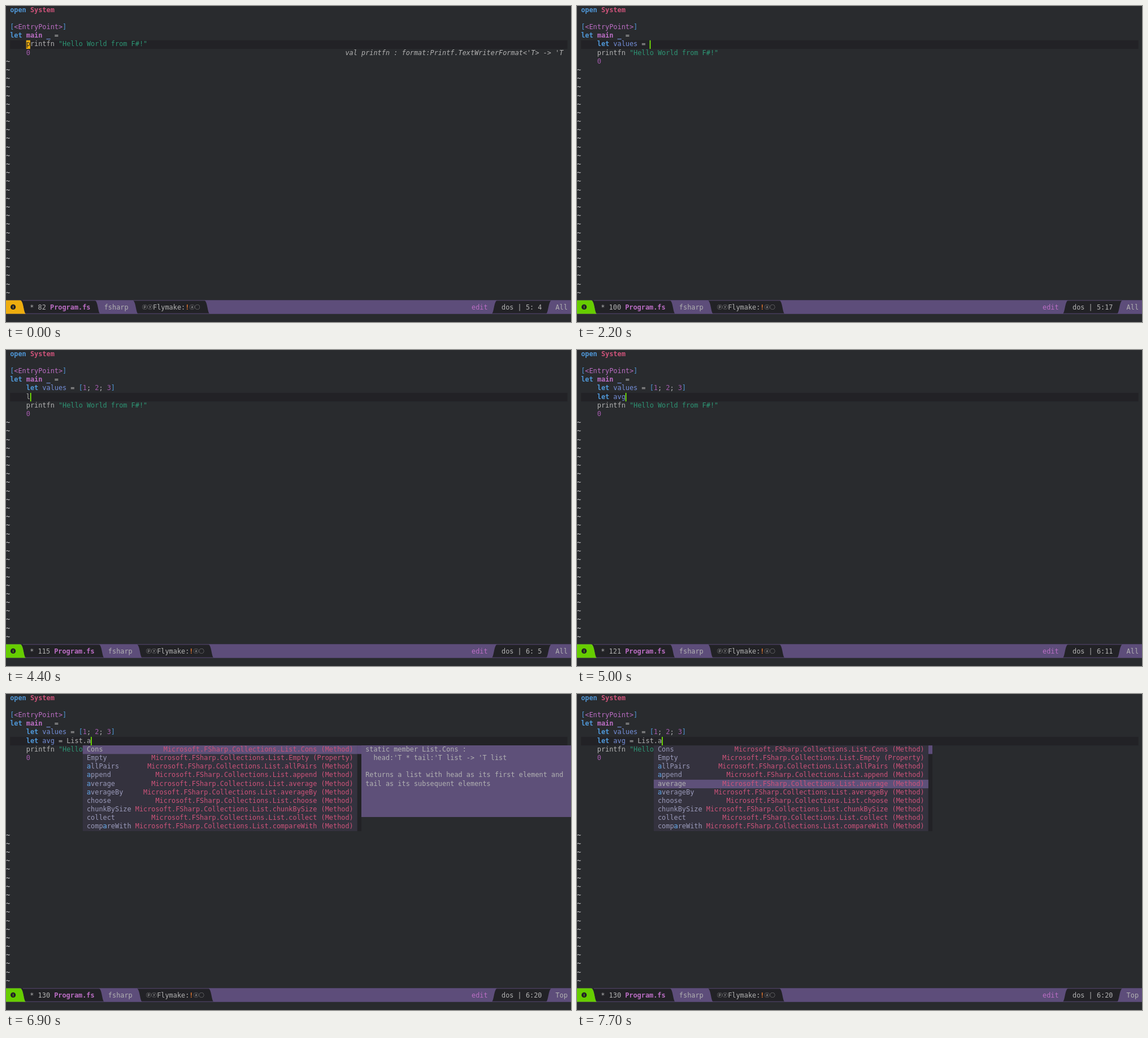
These frames come from a looping animation (1000x560 px, 8 s). An HTML page with a canvas:

```html
<!DOCTYPE html>
<html lang="en">
<head>
<meta charset="utf-8">
<title>F# completion</title>
<style>
html, body { margin: 0; width: 1000px; height: 560px; overflow: hidden; background: #292b2e; }
canvas { display: block; }
</style>
</head>
<body>
<canvas id="stage" width="1000" height="560"></canvas>
<script>
const ctx = document.getElementById('stage').getContext('2d', { alpha: false });
const CW = 7.148, LH = 15.19, LOOP = 8000;
const BG = '#292b2e', DARK = '#222226', PURPLE = '#5d4d7a', FG = '#b2b2b2', BLUE = '#4f97d7',
  PINK = '#ce537a', FUNC = '#bc6ec5', NUM = '#a45bad', VAR = '#7590db', STR = '#2d9574',
  ORANGE = '#eead0e', GREEN = '#66cd00', MENU = '#34323e', ITEM = '#9a9aba';

const FIRST = 'let values = [1; 2; 3]', SECOND = 'let avg = List.a';
// [time, characters typed so far]
const FIRST_KEYS = [[600, 0], [700, 1], [800, 2], [900, 3], [1000, 4], [1100, 5], [1300, 6], [1400, 7],
  [1500, 8], [1700, 9], [1800, 10], [1900, 11], [2000, 12], [2200, 13], [2300, 14], [2700, 16],
  [2800, 18], [2900, 20], [3000, 22]];
const SECOND_KEYS = [[3300, 0], [4400, 1], [4500, 2], [4600, 4], [4800, 5], [5000, 7], [5100, 8],
  [5300, 9], [5600, 10], [5800, 12], [5900, 13], [6000, 15], [6200, 16]];
const SELECTION = [[6300, 0], [7200, 1], [7400, 2], [7500, 3], [7700, 4]];
const ITEMS = ['Cons', 'Empty', 'allPairs', 'append', 'average', 'averageBy', 'choose',
  'chunkBySize', 'collect', 'compareWith'];

const at = (steps, t) => steps.reduce((v, [time, n]) => t >= time ? n : v, -1);

function rect(x, y, w, h, color) {
  ctx.fillStyle = color;
  ctx.fillRect(x, y, w, h);
}

// Characters sit on the fixed grid one by one.
function text(x, base, str, color, style = '') {
  ctx.font = `${style} 11.87px "DejaVu Sans Mono", monospace`;
  ctx.fillStyle = color;
  [...str].forEach((ch, i) => ch !== ' ' && ctx.fillText(ch, x + i * CW, base));
}

const put = (row, col, str, color = FG, style) =>
  text((col + 1) * CW, row * LH + 10.6, str, color, style);

function line(row, col, ...runs) {
  for (const [str, color, style] of runs) {
    put(row, col, str, color, style);
    col += str.length;
  }
}

function letLine(row, typed, nameLength) {
  const isKeyword = typed.startsWith('let');
  put(row, 4, typed.slice(0, 3), isKeyword ? BLUE : FG, isKeyword ? 'bold' : '');
  [...typed].forEach((ch, i) => {
    if (i < 3) return;
    const color = i < 4 + nameLength ? VAR : /\d/.test(ch) ? NUM : /[[\]]/.test(ch) ? BLUE : FG;
    put(row, 4 + i, ch, color);
  });
}

function sideNote(row, str) {
  put(row, 137 - str.length, str, FG, 'italic');
}

function menu(selected, t) {
  const x = 19 * CW, top = 6 * LH, end = 87 * CW;
  rect(x, top, end - x, 10 * LH, MENU);
  rect(end, top, CW, 10 * LH, DARK);
  rect(end, top, CW, LH, PURPLE);
  ITEMS.forEach((name, i) => {
    const row = 6 + i, on = i === selected;
    if (on) rect(x, row * LH, end - x, LH, '#5e5079');
    put(row, 19, name, on ? FG : ITEM);
    const hit = name.indexOf('a');
    if (!on && hit >= 0) {
      put(row, 19 + hit, 'a', BLUE);
    }
    const note = `Microsoft.FSharp.Collections.List.${name} (${name === 'Empty' ? 'Property' : 'Method'})`;
    put(row, 85 - note.length, note, PINK);
  });
  if (t >= 6900 && t < 7200) {
    rect(629, 91, 371, 127, '#5e5079');
    ["static member List.Cons :", "  head:'T * tail:'T list -> 'T list", '',
      'Returns a list with head as its first element and', 'tail as its subsequent elements']
      .forEach((str, i) => put(6 + i, 88, str));
  }
}

// One bar section whose edges follow a wave; lean is 1 or -1.
function section(from, to, color, leanFrom = 0, leanTo = 0) {
  const top = 521.5, bottom = 545.5, w = 10.3;
  const edge = (x, lean, down) => {
    const a = lean < 0 ? x + w : x, b = lean > 0 ? x + w : x, m = (a + b) / 2 + (b - a) * .1;
    if (down) {
      ctx.lineTo(a, top);
      ctx.bezierCurveTo(m, top, m, bottom, b, bottom);
    } else {
      ctx.lineTo(b, bottom);
      ctx.bezierCurveTo(m, bottom, m, top, a, top);
    }
  };
  ctx.beginPath();
  edge(from, leanFrom, false);
  edge(to, leanTo, true);
  ctx.closePath();
  ctx.fillStyle = color;
  ctx.fill();
}

function glyph(x, ch) {
  ctx.font = '9.6px "Noto Sans CJK JP", "Noto Sans CJK", sans-serif';
  ctx.fillStyle = FG;
  ctx.fillText(ch, x, 537);
}

function statusBar(mode, size, place, scroll) {
  const base = 537.6, digits = String(size).length, d = (digits - 2) * CW;
  rect(0, 521.5, 1000, 24, PURPLE);
  section(25, 156.7 + d, DARK, 1, 1);
  section(223.8 + d, 350.5 + d, DARK, 1, 1);
  section(859.5, 955.8, DARK, -1, -1);
  rect(30, 521.5, 970, .8, PURPLE);
  rect(30, 544.7, 970, .8, PURPLE);
  section(-1, 25, mode, 0, 1);

  ctx.fillStyle = DARK;
  ctx.beginPath();
  ctx.arc(12.6, 533.4, 4.6, 0, 7);
  ctx.fill();
  rect(12.2, 531, 1, 5, mode);

  text(42.3, base, `* ${size}`, FG);
  text(78 + d, base, 'Program.fs', FUNC, 'bold');
  text(173.7 + d, base, 'fsharp', FG);
  glyph(240.7 + d, 'ⓟ');
  glyph(250.2 + d, 'ⓨ');
  text(260 + d, base, 'Flymake:', FG);
  text(317.2 + d, base, '!', '#dc752f', 'bold');
  glyph(324.4 + d, 'ⓐ');
  glyph(334 + d, '○');
  text(824, base, 'edit', FUNC);
  text(877, base, `dos | ${place}`, FG);
  text(972.6, base, scroll, FG);
}

function draw(t) {
  const first = at(FIRST_KEYS, t), second = at(SECOND_KEYS, t), selected = at(SELECTION, t);
  const added = (first >= 0) + (second >= 0), last = 4 + added;
  const current = first < 0 ? (t < 400 ? 4 : 3) : last - 1;
  const col = 4 + Math.max(0, second >= 0 ? second : first);
  const pairOpen = first >= 14 && first < 22;

  rect(0, 0, 1000, 560, BG);
  rect(CW, current * LH, 138 * CW, LH, DARK);

  line(0, 0, ['open ', BLUE, 'bold'], ['System', PINK, 'bold']);
  line(2, 0, ['[', BLUE], ['<EntryPoint>', FUNC], [']', BLUE]);
  line(3, 0, ['let ', BLUE, 'bold'], ['main ', FUNC, 'bold'], ['_ ', VAR, 'bold'], ['=', FG]);
  if (first >= 0) letLine(4, FIRST.slice(0, first) + (pairOpen ? ']' : ''), 6);
  if (second >= 0) letLine(5, SECOND.slice(0, second), 3);
  line(last, 4, ['printfn ', FG], ['"Hello World from F#!"', STR]);
  put(last + 1, 4, '0', NUM);

  if (t >= 3100 && t < 3600) {
    const x = 18 * CW, y = 4 * LH;
    rect(x, y, CW, LH, t < 3300 ? DARK : BG);
    put(4, 17, '[', '#86dc2f', 'bold');
    rect(x, y + 12, CW, 1, '#86dc2f');
  }
  if (t < 400) sideNote(5, "val printfn : format:Printf.TextWriterFormat<'T> -> 'T");
  if (t >= 3100 && t < 3300) sideNote(5, 'val values : int list');

  for (let row = selected < 0 ? last + 2 : 16; row < 34; row++) put(row, -1, '~', '#d8d8d8');

  const x = (col + 1) * CW, y = current * LH;
  if (first < 0) {
    rect(x, y, CW, LH, ORANGE);
    put(current, col, current === 4 ? 'p' : 'm', DARK, current === 4 ? '' : 'bold');
  } else {
    rect(x, y, 1.6, LH, '#7fff00');
  }
  if (selected >= 0) menu(selected, t);

  const size = 82 + 5 * added + Math.max(0, first) + Math.max(0, second) + pairOpen;
  statusBar(first < 0 ? ORANGE : GREEN, size,
    `${current + 1}:${String(col).padStart(2)}`, selected < 0 ? 'All' : 'Top');
}

const start = performance.now();
function tick() {
  draw((performance.now() - start) % LOOP);
  requestAnimationFrame(tick);
}
tick();
</script>
</body>
</html>
```
